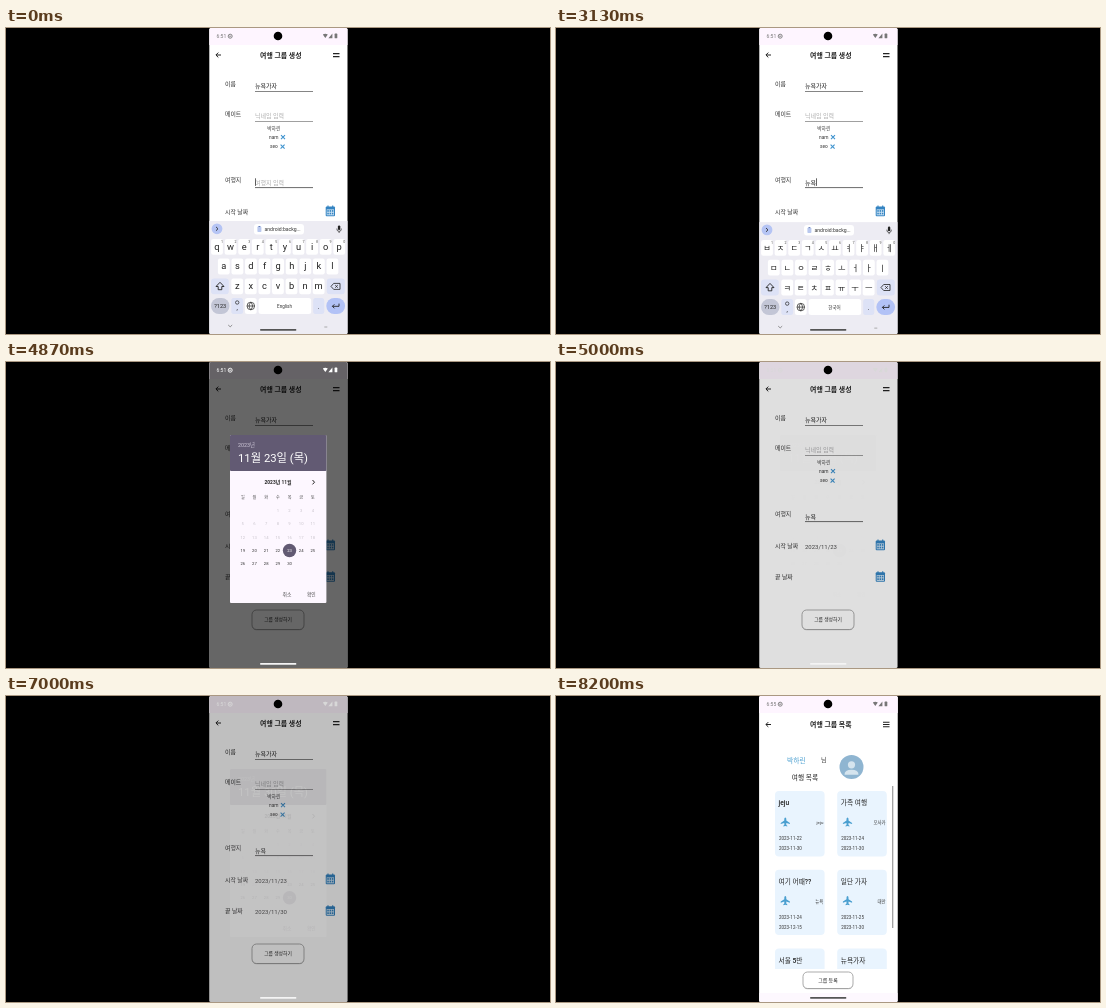
An HTML page that plays this animation: 544 by 306 pixels, repeating every 8.27 s.

```html
<!DOCTYPE html>
<html lang="ko">
<head>
<meta charset="utf-8">
<title>여행 그룹 생성</title>
<style>
html, body { margin: 0; width: 100%; height: 100%; overflow: hidden; background: #000; }
svg { display: block; width: 100%; height: 100%; }
text { font-family: Roboto, "Noto Sans CJK KR", "Noto Sans CJK", sans-serif; white-space: pre; }
</style>
</head>
<body>
<svg id="stage" viewBox="0 0 544 306"></svg>
<script>
const LOOP = 8270, STEP = 200 / 3;
const PLUM = '#625a73', BLUE = '#4a9fd0', INK = '#222';

// Markup helpers
const txt = (x, y, size, s, fill = INK, extra = '') =>
  `<text x="${x}" y="${y}" font-size="${size}" fill="${fill}" ${extra}>${s}</text>`;
const mid = (x, y, size, s, fill = INK, extra = '') =>
  txt(x, y, size, s, fill, 'text-anchor="middle" ' + extra);
const box = (x, y, w, h, r, fill, extra = '') =>
  `<rect x="${x}" y="${y}" width="${w}" height="${h}" rx="${r}" fill="${fill}" ${extra}/>`;
const dot = (x, y, r, fill) => `<circle cx="${x}" cy="${y}" r="${r}" fill="${fill}"/>`;
const line = (d, color = INK, w = 1, extra = '') =>
  `<path d="${d}" fill="none" stroke="${color}" stroke-width="${w}" ${extra}/>`;
const group = (id, body, extra = '') => `<g id="${id}" ${extra}>${body}</g>`;
const bold = 'font-weight="700"', medium = 'font-weight="500"';

const header = (title, y, bars) =>
  line(`M215 ${y}h-5m2.3-2.4l-2.4 2.4l2.4 2.4`) +
  mid(274.8, y + 2.5, 6.9, title, INK, bold) +
  bars.map(b => line(`M327 ${y + b}h6.5`, INK, 1.1)).join('');

const pushButton = (x, y, w, h, label, size) =>
  box(x, y + .8, w, h, 4.5, '#999', 'opacity=".55"') +
  box(x, y, w, h, 4.5, '#fff', 'stroke="#888" stroke-width=".7"') +
  mid(x + w / 2, y + h / 2 + 1.7, size, label, INK, medium);

function calendarIcon(y) {
  let s = box(319.7, y - 4.4, 9.3, 9.6, 1, '#3484c2') +
    line(`M322 ${y - 5.4}v2.4m4.7-2.4v2.4`, '#3484c2', 1.1) +
    box(320.7, y - 1.6, 7.3, 5.9, 0, '#cfe4f4');
  for (let i = 0; i < 6; i++)
    s += box(321.3 + i % 3 * 2.3, y - .9 + (i / 3 | 0) * 2.6, 1.5, 1.7, 0, '#3484c2');
  return s;
}

const cross = (x, y) => line(`M${x - 2} ${y - 2}l4 4m0-4l-4 4`, '#3f93cf', 1.1);
const underline = (y, color) => line(`M249 ${y}h58`, color, .8);

function formPage() {
  const label = (y, s) => txt(219, y, 5.9, s, '#333');
  return box(203, 0, 139, 306, 0, '#fff') + box(203, 0, 139, 17, 0, '#fef5ff') +
    header('여행 그룹 생성', 27, [-1.4, 1.6]) +
    label(58.3, '이름') + txt(249, 60.3, 6, '뉴욕가자') + underline(63.5, '#666') +
    label(88, '메이트') + txt(249, 90.4, 6, '닉네임 입력', '#aaa') + underline(93.5, '#888') +
    mid(267.8, 101.6, 4.8, '박하린', '#333') +
    mid(267.8, 110.7, 4.8, 'nam', '#333') + cross(277, 109.2) +
    mid(267.8, 120, 4.8, 'seo', '#333') + cross(276.6, 118.6) +
    label(153.8, '여행지') + txt(249, 156.6, 6, '여행지 입력', '#aaa', 'id="hint"') +
    txt(249, 156.6, 6, '', INK, 'id="place"') + box(0, 150.3, .7, 7.6, 0, '#222', 'id="caret"') +
    underline(159.6, '#444') +
    label(186.3, '시작 날짜') + txt(249, 187, 6, '2023/11/23', '#444', 'id="from"') + calendarIcon(183) +
    label(217.3, '끝 날짜') + txt(249, 218, 6, '2023/11/30', '#444', 'id="until"') + calendarIcon(214.6) +
    pushButton(246, 248, 52, 19.5, '그룹 생성하기', 4.8);
}

// Keyboard
const layouts = {
  en: ['qwertyuiop', 'asdfghjkl', 'zxcvbnm'],
  ko: ['ㅂㅈㄷㄱㅅㅛㅕㅑㅐㅔ', 'ㅁㄴㅇㄹㅎㅗㅓㅏㅣ', 'ㅋㅌㅊㅍㅠㅜㅡ']
};
const rowX = [211, 217.8, 231.2], rowY = [218.8, 238.5, 258.4];

function keyPos(ch) {
  for (let r = 0; r < 3; r++) {
    const i = layouts.ko[r].indexOf(ch);
    if (i >= 0) return [rowX[r] + i * 13.58, rowY[r]];
  }
}

function letters(lang) {
  const size = lang === 'en' ? 9.3 : 8.2, drop = lang === 'en' ? 2.8 : 3;
  return layouts[lang].map((row, r) => [...row].map((ch, i) =>
    mid(rowX[r] + i * 13.58, rowY[r] + drop, size, ch) +
    (r ? '' : mid(216 + i * 13.58, 214.6, 3.6, (i + 1) % 10, '#555'))).join('')).join('') +
    mid(278.5, 279.8, 4.6, lang === 'en' ? 'English' : '한국어', '#333');
}

function keyboard() {
  const caps = [10, 9, 7].map((n, r) => Array.from({ length: n }, (_, i) =>
    box(rowX[r] + i * 13.58 - 5.9, rowY[r] - 7.9, 11.8, 15.8, 2.2, '#fff')).join('')).join('');
  const soft = '#dde2f6';
  return box(203, 193, 139, 113, 0, '#edecf3') +
    dot(211, 200.8, 5.4, '#b5c4f4') + line('M210 198.9l2 1.9l-2 1.9', '#333', .9) +
    box(331.9, 197.4, 2.4, 4.6, 1.2, INK) + line('M330.8 200.6q0 2.8 2.3 2.8t2.3-2.8m-2.3 2.8v1.6', INK, .7) +
    group('clip', box(248, 196, 50, 10.4, 3, '#fff') + box(251.4, 198.6, 4, 5.4, .8, '#b9c8ee') +
      line('M252.5 198.5h1.8', '#5670b0', .9) + txt(258.5, 203, 5.1, 'android:backg...', '#333')) +
    group('words', line('M253 197.5v7m37-7v7', '#c4c4cc', .6) +
      [235, 271.5, 308].map((x, i) => mid(x, 203, 5.2, '', '#333', `id="word${i}"`)).join('')) +
    caps + box(0, 0, 11.8, 15.8, 2.2, '#e2e1e6', 'id="pressed"') +
    box(205, 250.5, 17.8, 15.8, 3, soft) + line('M214 254.3l-4 4.2h2.2v3.2h3.6v-3.2h2.2z', INK, .9) +
    box(320.8, 250.5, 18, 15.8, 3, soft) +
    line('M325 258.4l2.7-3h6.3v6h-6.3zm4.2-1.3l2.6 2.6m0-2.6l-2.6 2.6', INK, .8) +
    box(205, 270, 18.5, 16, 8, '#c3c6d6') + mid(214.2, 280, 5.6, '?123') +
    box(225.3, 270, 11.8, 16, 2.5, soft) + line('M229.5 274.5a1.7 1.7 0 1 0 3.4 0a1.7 1.7 0 1 0-3.4 0', INK, .7) +
    mid(231.2, 282.4, 6.5, ',') +
    box(238.9, 270, 11.8, 16, 2.5, '#fff', 'id="globe"') +
    line('M241 278a3.8 3.8 0 1 0 7.6 0a3.8 3.8 0 1 0-7.6 0h7.6m-3.8-3.8q-3.4 3.8 0 7.6q3.4-3.8 0-7.6', INK, .7) +
    box(252.6, 270, 52.6, 16, 2.5, '#fff') +
    box(307.2, 270, 11, 16, 2.5, soft) + mid(312.7, 281, 7, '.') +
    box(320.3, 270, 18.8, 16, 8, '#b2c2f6') + line('M333 275.6v2.7h-6.6m2-2l-2 2l2 2', INK, .9) +
    group('en', letters('en')) + group('ko', letters('ko')) +
    line('M222.2 297l2 1.8l2-1.8', '#777', .8) + line('M318.3 299h3', '#999', .8) +
    group('bubble', box(-12.3, -13, 24.6, 26.4, 12.3, '#777', 'opacity=".22"') +
      box(-12, -13, 24, 25.4, 12, '#fff') + mid(0, 3.8, 11, '', INK, 'id="popped"'));
}

// Date picker
const week = '일월화수목금토';
const cell = d => [236.8 + (d + 2) % 7 * 11.68, 148.4 + ((d + 2) / 7 | 0) * 13.35];

function picker() {
  let s = box(224, 73, 96.4, 168, 1, '#fdf7ff') + box(224, 73, 96.4, 36, 1, PLUM) +
    txt(232, 85, 5.4, '2023년', '#cfc9d8') + txt(232, 100, 11.3, '', '#fff', 'id="picked"') +
    mid(272, 122, 4.9, '2023년 11월', INK, bold) + line('M306.5 118l2 2.2l-2 2.2', INK, 1) +
    dot(0, 0, 6.7, PLUM).replace('<circle', '<circle id="ring"');
  [...week].forEach((w, i) => s += mid(236.8 + i * 11.68, 137.2, 4.1, w, '#444'));
  for (let d = 1; d <= 30; d++) {
    const [x, y] = cell(d);
    s += mid(x, y + 1.5, 4.2, d, '#333', `id="day${d}"`);
  }
  return s + mid(281, 233.6, 4.8, '취소', '#444') + mid(305.3, 233.6, 4.8, '확인', '#444');
}

// Group list
const trips = [
  ['jeju', 'jeju', '11-22', '11-30'], ['가족 여행', '오사카', '11-24', '11-30'],
  ['여기 어때??', '뉴욕', '11-24', '12-15'], ['일단 가자', '대만', '11-25', '11-30'],
  ['서울 5반', '서울', '11-25', '11-30'], ['뉴욕가자', '뉴욕', '11-23', '11-30']
];

function card([name, place, a, b], i) {
  const x = i % 2 ? 281.2 : 219, y = 95 + (i / 2 | 0) * 78.7;
  const plane = `M${x + 10.3} ${y + 26.4}q1 0 1 1.6v1.6l3.6 2.3v1.1l-3.6-1.1v2l1 .9v.8l-2-.6l-2 .6v-.8l1-.9v-2l-3.6 1.1v-1.1l3.6-2.3v-1.6q0-1.6 1-1.6z`;
  return box(x, y, 49.6, 65.4, 4, '#e9f4fe') + txt(x + 3.6, y + 14.3, 6.7, name, INK, medium) +
    `<path d="${plane}" fill="${BLUE}"/>` +
    txt(x + 48.4, y + 33, 4.4, place, '#333', 'text-anchor="end"') +
    txt(x + 4, y + 49, 4.5, '2023-' + a, '#333') + txt(x + 4, y + 59, 4.5, '2023-' + b, '#333');
}

function listPage() {
  return box(203, 0, 139, 306, 0, '#fff') + box(203, 0, 139, 17, 0, '#fef5ff') +
    box(203, 297, 139, 9, 0, '#fdf8fe') +
    header('여행 그룹 목록', 28.5, [-2.3, 0, 2.3]) +
    txt(231, 67.2, 6.8, '박하린', BLUE) + txt(265, 66.3, 6, '님', '#333') +
    dot(295.5, 71, 12, '#8fb5d1') + dot(295.5, 68.8, 3.6, '#d5e4ee') +
    '<path d="M288.5 78.8q0-5 7-5t7 5z" fill="#d5e4ee"/>' +
    mid(249, 84.4, 6.7, '여행 목록', INK, medium) +
    `<g clip-path="url(#rows)">${trips.map(card).join('')}</g>` +
    box(336.1, 90, 1.2, 142, 0, '#999') +
    pushButton(247, 276, 50, 16.5, '그룹 등록', 5);
}

const status = txt(210.6, 10.2, 5, '6:51', 'currentColor', 'id="clock"') +
  line('M222.2 8.2a2 2 0 1 0 4 0a2 2 0 1 0-4 0m1 0h2', 'currentColor', .9) +
  '<path d="M316.8 6.6q2.5-1.8 5 0l-2.5 3.4zM326.4 5.6v4.6h-4z" fill="currentColor"/>' +
  box(328.6, 5.6, 2.7, 4.7, .6, 'currentColor');

stage.innerHTML =
  '<clipPath id="phone"><rect x="203.3" width="138.2" height="306" rx="1.5"/></clipPath>' +
  '<clipPath id="rows"><rect x="203" y="90" width="139" height="183"/></clipPath>' +
  box(0, 0, 544, 306, 0, '#000') +
  `<g clip-path="url(#phone)">` + formPage() + group('keys', keyboard()) +
  box(203, 0, 139, 306, 0, '#000', 'id="shade"') + group('dialog', picker()) +
  group('list', listPage()) + group('status', status) + dot(272, 8, 4.3, '#000') +
  box(254, 301.1, 36.4, 1.6, .8, '#444', 'id="pill"') + '</g>';

const el = {};
document.querySelectorAll('[id]').forEach(n => el[n.id] = n);
const show = (id, on) => el[id].style.display = on ? '' : 'none';
const fade = (id, a) => { show(id, a > 0); el[id].setAttribute('opacity', a); };

// Latest row whose time has come
const at = (table, t) => table.filter(r => r[0] <= t).pop();
function ramp(table, t) {
  let [t0, v0] = table[0];
  for (const [t1, v1] of table) {
    if (t < t1) return v0 + (v1 - v0) * Math.max(0, (t - t0) / (t1 - t0));
    [t0, v0] = [t1, v1];
  }
  return v0;
}

const presses = [[1060, 1260, 'ㄴ'], [1395, 1525, 'ㅠ'], [1660, 1795, 'ㅇ'], [2130, 2195, 'ㅛ'], [2330, 2530, 'ㄱ']];
const typed = [[0, ''], [1260, 'ㄴ'], [1525, '뉴'], [1795, '늉'], [2195, '뉴요'], [2530, '뉴욕']];
const guesses = [[0, []], [1260, ['ㄴ', 'ㅇ', 'ㅁ']], [1525, ['뉴', '뉴스', '뉴욕']],
  [1795, ['늉', '뉴', '뉴은']], [2195, ['뉴요', '뉴욕', '뉴용']], [2530, ['뉴욕', '뉴욕은', '뉴욕에']], [2995, []]];
const picks = [[0, 19], [4530, 23], [5730, 30]];
const blinks = [[130, 600], [1060, 1260], [3660, 3990]];
const slide = [[3130, 0], [3200, 18], [3267, 60], [3333, 98], [3400, 113]];
const dimming = [[3940, 0], [4000, .35], [4133, 1], [4870, 1], [4934, .42], [5067, 0],
  [5200, 0], [5267, .35], [5400, 1], [6934, 1], [7000, .42], [7067, .16], [7134, .05], [7200, 0]];
const entering = [[8067, 0], [8134, .55], [8200, 1]];

function draw(ms) {
  const t = Math.floor((ms + 5) / STEP) * STEP + 1;
  const text = at(typed, t)[1];
  el.place.textContent = text;
  show('hint', !text);
  el.caret.setAttribute('x', 249.2 + text.length * 5.55);
  show('caret', t < 4000 && !blinks.some(([a, b]) => t >= a && t < b));

  const words = at(guesses, t)[1];
  show('clip', !words.length);
  show('words', words.length);
  words.forEach((w, i) => el['word' + i].textContent = w);
  const korean = t >= 665;
  show('en', !korean);
  show('ko', korean);
  el.globe.setAttribute('fill', t > 530 && t < 730 ? '#dddce2' : '#fff');
  const press = presses.find(([a, b]) => t >= a && t < b);
  show('bubble', press);
  show('pressed', press);
  if (press) {
    const [x, y] = keyPos(press[2]);
    el.popped.textContent = press[2];
    el.bubble.setAttribute('transform', `translate(${x} ${y - 22})`);
    el.pressed.setAttribute('x', x - 5.9);
    el.pressed.setAttribute('y', y - 7.9);
  }
  const drop = ramp(slide, t);
  show('keys', drop < 113);
  el.keys.setAttribute('transform', `translate(0 ${drop})`);

  const dim = ramp(dimming, t);
  fade('shade', dim * .6);
  fade('dialog', dim ** 3);
  show('from', t > 4930);
  show('until', t > 6990);
  const day = at(picks, t)[1], [cx, cy] = cell(day), second = t > 5170;
  el.picked.textContent = `11월 ${day}일 (${week[(day + 2) % 7]})`;
  el.ring.setAttribute('cx', cx);
  el.ring.setAttribute('cy', cy);
  for (let d = 1; d <= 30; d++) {
    const off = d < 19 || second && d > 19 && d < 23;
    el['day' + d].setAttribute('fill', d === day ? '#fff' : off ? '#c9c4cc' : '#333');
  }

  fade('list', ramp(entering, t));
  el.clock.textContent = t < 7460 ? '6:51' : '6:55';
  el.status.style.color = dim > .2 ? (dim > .8 ? '#fff' : '#d8d8d8') : '#777';
  el.pill.setAttribute('fill', dim > .2 ? '#f4f4f4' : '#555');
  show('pill', t < 5390 || t > 6060);
}

const start = performance.now();
(function tick() {
  draw((performance.now() - start) % LOOP);
  requestAnimationFrame(tick);
})();
</script>
</body>
</html>
```
